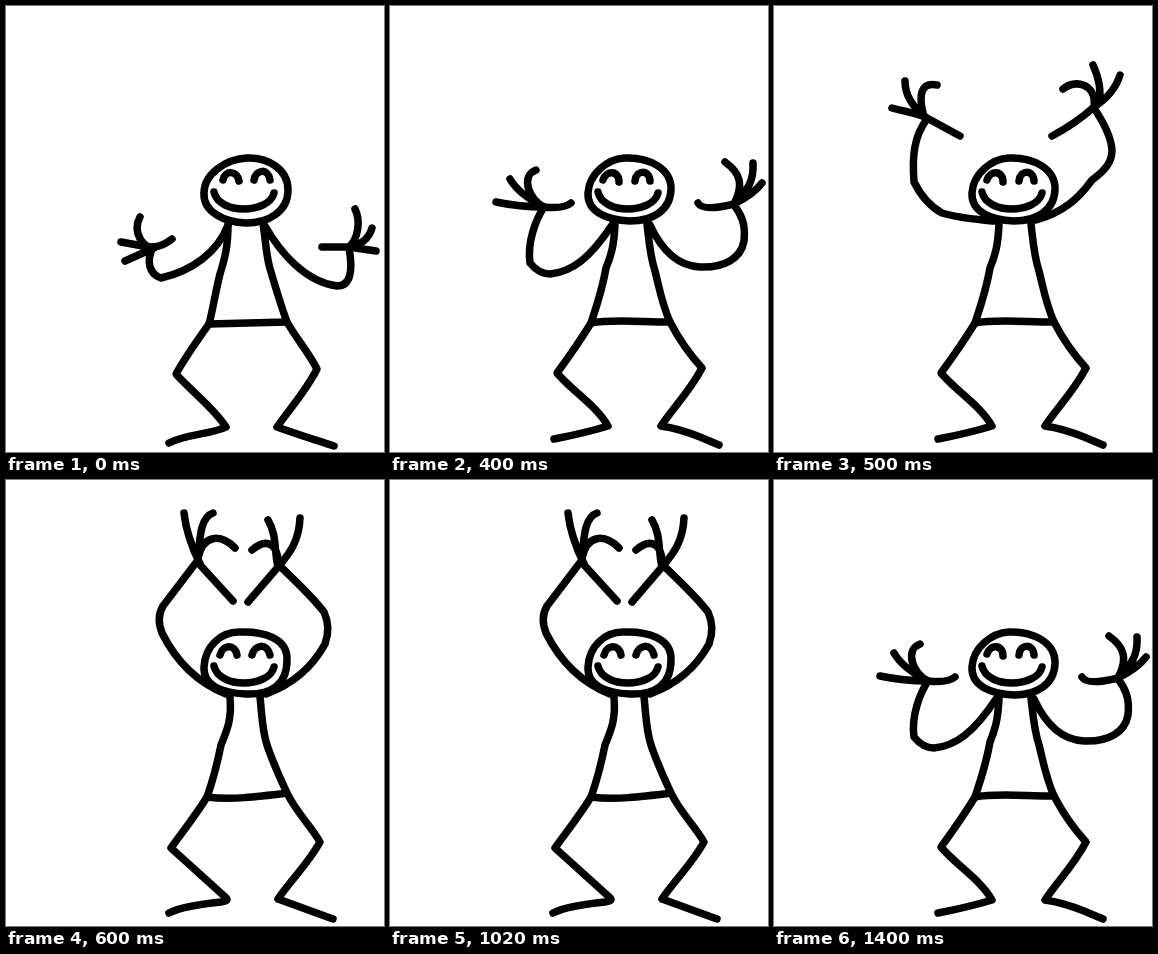
Recreate the animation shown at these times as an HTML page without scripts. Size 378 by 446 pixels, loop 1500 ms.

```html
<!DOCTYPE html>
<html lang="en">
<head>
<meta charset="utf-8">
<title>Heart dance</title>
<style>
  html, body { margin: 0; width: 100%; height: 100%; overflow: hidden; background: #fff; }
  svg { display: block; width: 100vw; height: 100vh; fill: none; stroke: #000; stroke-width: 7.5; stroke-linecap: round; stroke-linejoin: round; }
  .pose { visibility: hidden; animation: 1.5s step-end infinite; }
  .low { animation-name: low; }
  .rise { animation-name: rise; }
  .high { animation-name: high; }
  .heart { animation-name: heart; }
  @keyframes low { 0% { visibility: visible; } 26.667%, 100% { visibility: hidden; } }
  @keyframes rise { 0%, 33.333%, 100% { visibility: hidden; } 26.667%, 93.333% { visibility: visible; } }
  @keyframes high { 0%, 40%, 93.333%, 100% { visibility: hidden; } 33.333%, 86.667% { visibility: visible; } }
  @keyframes heart { 0%, 86.667%, 100% { visibility: hidden; } 40% { visibility: visible; } }
</style>
</head>
<body>
<svg viewBox="0 0 378 446">
  <defs>
    <path id="smile" d="M208 186C213 209 263 208 268 187"/>
    <!-- head, eyes, torso and legs shared by the two moving poses -->
    <g id="body">
      <path d="M235 152C258 151 282 162 281 184C280 205 262 215 240 215C217 214 197 206 198 187C199 168 217 153 235 152Z"/>
      <path d="M213 174C216 164 229 164 229 176M245 175C246 164 259 163 260 175"/>
      <use href="#smile"/>
      <path d="M225 218C224 240 221 250 216 262C212 285 206 302 201 317C220 313 250 316 280 316C272 298 270 285 265 265C260 250 259 235 257 218"/>
      <path d="M201 317C190 335 178 352 167 367C182 385 207 400 218 420C205 424 185 429 164 433"/>
      <path d="M280 316C290 335 301 350 312 362C300 385 283 402 271 420C285 422 300 427 310 431L329 439"/>
    </g>
  </defs>

  <g class="pose low">
    <path d="M241 152C260 151 282 162 282 184C282 206 262 217 240 217C218 216 197 206 198 187C198 168 220 153 241 152Z"/>
    <path d="M217 174C219 164 231 164 233 175M248 174C250 163 262 162 264 174"/>
    <use href="#smile"/>
    <path d="M222 219C222 240 219 252 214 268C209 288 207 303 203 318L281 316C275 300 270 283 265 266C260 252 260 235 257 218"/>
    <path d="M203 318C193 332 180 350 170 368C185 385 208 402 220 421C207 428 180 428 163 437"/>
    <path d="M281 316C290 332 303 347 311 363C300 385 282 405 271 421C290 428 310 434 328 440"/>
    <path d="M222 219C212 246 186 265 155 272C143 268 140 255 147 241"/>
    <path d="M134 211C126 226 137 243 148 241Q157 240 166 233M115 236L148 242L119 255"/>
    <path d="M259 220C275 248 300 276 331 280C345 280 347 264 343 242"/>
    <path d="M316 241H343L370 245M349 203C355 215 352 233 343 241C355 239 363 232 366 222"/>
  </g>

  <g class="pose rise">
    <use href="#body"/>
    <path d="M222 219C200 252 182 266 160 268Q149 268 140 257C137 236 146 213 154 201"/>
    <path d="M106 196C125 200 138 201 154 201Q174 203 181 197M120 173C128 187 142 195 154 201M146 164C130 170 139 194 154 201"/>
    <path d="M260 219C272 245 288 260 310 261C335 262 351 252 354 235C356 218 351 208 344 199"/>
    <path d="M308 197C312 204 328 202 344 198C356 192 366 185 372 177M335 156C352 168 353 180 344 198C358 184 364 175 363 157"/>
  </g>

  <g class="pose high">
    <use href="#body"/>
    <path d="M219 215C200 213 184 212 168 207C157 201 147 190 140 176C138 150 140 130 153 113"/>
    <path d="M118 102C133 106 143 107 153 112L186 130M131 75C131 92 142 104 153 112M163 79C146 76 145 90 149 107"/>
    <path d="M262 214C290 206 305 192 318 174C333 163 338 155 338 144C337 130 328 114 320 102"/>
    <path d="M278 130C295 121 310 110 320 101C334 92 342 82 346 69M289 83C300 73 323 77 320 101M319 59C324 70 328 82 325 96"/>
  </g>

  <g class="pose heart">
    <path d="M233 152C257 151 282 158 281 180C281 205 265 215 240 214C215 213 197 205 198 187C199 166 215 152 233 152Z"/>
    <path d="M214 175C217 164 229 164 231 175M246 175C249 164 261 163 264 175"/>
    <use href="#smile"/>
    <path d="M224 217C226 240 221 250 215 265C211 285 206 303 201 317C225 320 250 317 281 313C274 298 266 280 261 265C256 250 256 235 254 217"/>
    <path d="M201 317C190 335 177 351 165 368L217 415Q226 421 215 422C195 424 175 427 163 433"/>
    <path d="M281 313C290 332 305 346 314 362C302 384 283 402 272 419L327 439"/>
    <path d="M220 214C190 202 170 181 156 153Q150 138 157 126L192 80"/>
    <path d="M178 33C180 52 186 68 195 86Q206 98 227 121M207 33C195 37 194 55 192 78C197 55 214 53 229 68"/>
    <path d="M260 214C290 203 308 184 319 164C323 153 323 143 318 132C305 115 288 100 273 85"/>
    <path d="M294 38C293 60 285 72 272 87L242 122M262 40C271 55 268 70 272 87C273 62 260 58 246 70"/>
  </g>
</svg>
</body>
</html>
```
